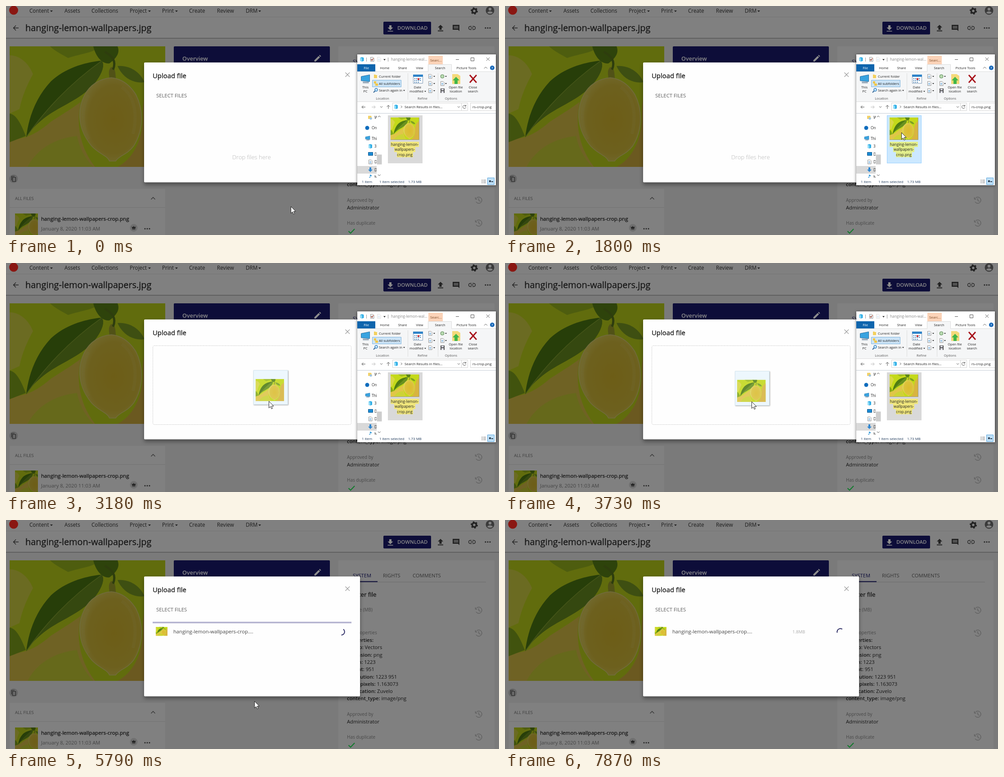
Write an HTML page that moves like this. It is 1096 px wide and 511 px high and loops after 8000 ms.

```html
<!DOCTYPE html>
<html lang="en">
<head>
<meta charset="utf-8">
<title>Upload a file</title>
<style>
  html, body { margin: 0; width: 100%; height: 100%; overflow: hidden; background: #7a7a7a; }
  svg { display: block; }
  #stage { width: 100%; height: 100%; font-family: "Open Sans", "Noto Sans", sans-serif; }
  text { white-space: pre; }
  .nav { font-size: 11.7px; fill: #1c1c1c; }
  .body { font-size: 11.2px; fill: #141414; }
  .hint { font-size: 10px; fill: #484848; }
  .mid { fill: #161616; stroke: #161616; stroke-width: .3; }
  .semi { font-weight: 600; }
  .c { text-anchor: middle; }
  .line { fill: none; stroke: #222; stroke-width: 1.3; }
  .navy { fill: #0d0d39; }
  .win { font-size: 7.4px; fill: #222; }
  .win .line { stroke: #555; stroke-width: 1; }
  #dialog { filter: drop-shadow(0 5px 4px rgba(0,0,0,.38)); }
  #explorer > .frame { filter: drop-shadow(0 1px 3px rgba(0,0,0,.55)); }
  #ghost > .card { filter: drop-shadow(1px 1px 1px rgba(0,0,0,.35)); }
</style>
</head>
<body>
<svg id="stage" viewBox="0 0 1096 511">
  <defs>
    <radialGradient id="peel" cx=".55" cy=".5" r=".55">
      <stop offset="0" stop-color="#dcbc2e"/>
      <stop offset=".75" stop-color="#dcc23c"/>
      <stop offset="1" stop-color="#e4d45c"/>
    </radialGradient>
    <g id="art">
      <path fill="#c4d91a" d="M0 0H346V269H0Z"/>
      <path fill="#d8d844" d="M0 20C24 20 44 40 52 62C40 84 28 110 22 140L0 150Z"/>
      <path fill="#e0c648" d="M0 206C30 210 60 196 92 168C120 150 140 138 158 124C146 180 160 230 190 269H0Z"/>
      <path fill="#cdd336" d="M40 269C60 230 100 205 150 200C156 230 170 252 186 269Z"/>
      <path fill="#d8b440" d="M346 44C316 62 298 90 296 150C298 206 276 250 240 269H346Z"/>
      <path fill="#84a81c" d="M0 150C16 152 26 176 36 200L0 214Z"/>
      <path fill="#9ebc1e" d="M90 0H200C190 14 160 16 130 26C116 18 100 10 90 0Z"/>
      <path fill="#5c8716" d="M186 0H240C246 14 238 26 222 38C206 40 192 24 186 0Z"/>
      <path fill="#7da024" d="M240 44C264 42 288 54 300 80C278 84 252 72 240 44Z"/>
      <path fill="#4f7c12" d="M37 203C42 160 58 114 92 78C122 50 164 36 204 32C214 40 204 66 184 88C156 118 112 134 82 156C58 174 46 188 37 203Z"/>
      <path fill="#6a9220" d="M37 203C76 146 132 84 204 32C214 40 204 66 184 88C156 118 112 134 82 156C58 174 46 188 37 203Z"/>
      <path fill="none" stroke="#8fae34" stroke-width="1.500" d="M38 201C76 146 132 84 204 33"/>
      <path fill="#a3a62e" d="M222 84C224 66 216 56 226 46C238 50 234 62 238 84Z"/>
      <path fill="none" stroke="#5d7a1c" stroke-width="5" d="M230 52C238 32 228 22 212 12"/>
      <path fill="url(#peel)" stroke="#e4d87c" stroke-width="1.500" d="M226 70C248 72 266 84 281 108C300 146 296 190 276 222C262 242 242 244 236 256L222 256C218 244 198 240 182 222C154 188 148 146 166 110C178 86 200 72 226 70Z"/>
      <path fill="none" stroke="#ece49a" stroke-width="7" stroke-dasharray="1 2" opacity=".35" d="M176 206C160 176 160 138 176 108M250 92C276 108 286 150 274 196"/>
    </g>
    <path id="history" fill="none" stroke="#505050" d="M-5.500-4A7 7 0 1 1-6 4M-7.500-6V-2H-3.500M0-4V1L4 3"/>
    <path id="caret" d="M0 0H6L3 3.2Z"/>
    <g id="cube"><path fill="#35b0e6" d="M-4-3.5L0-5 4-3.5V3.5L0 5-4 3.5Z"/><path fill="#8fdcf8" d="M-4-3.5L0-2V5L-4 3.5Z"/></g>
    <g id="page"><path fill="#fff" stroke="#777" stroke-width=".8" d="M-3.5-4.5H2L4-2.5V4.5H-3.5Z"/><path fill="#3f8fd0" d="M-2-1H2V0H-2ZM-2 1.5H2V2.5H-2Z"/></g>
    <g id="pc"><path fill="#38a3e0" stroke="#2c6d9c" stroke-width=".5" d="M-5-3L5-5V3L-5 2Z"/><path fill="#9ab" d="M-3 3H4V5H-3Z"/></g>
    <clipPath id="tree"><path d="M781 240H824V383H781Z"/></clipPath>
  </defs>

  <g id="app">
    <path fill="#7a7a7a" d="M0 0H1096V511H0Z"/>
    <path fill="#606060" d="M0 70H1096V73H0Z"/>
    <path fill="#808080" d="M0 0H1096V71H0Z"/>
    <path fill="#747474" d="M0 24H1096V25H0Z"/>
    <circle cx="17" cy="9.500" r="10" fill="#8a1712"/>
    <g class="nav">
      <text x="52" y="14.500">Content</text><text x="130" y="14.500">Assets</text>
      <text x="190" y="14.500">Collections</text><text x="275" y="14.500">Project</text>
      <text x="347" y="14.500">Print</text><text x="407" y="14.500">Create</text>
      <text x="469" y="14.500">Review</text><text x="533" y="14.500">DRM</text>
      <use href="#caret" x="98" y="10"/><use href="#caret" x="316" y="10"/>
      <use href="#caret" x="376" y="10"/><use href="#caret" x="561" y="10"/>
    </g>
    <circle cx="1041" cy="11" r="4.500" fill="none" stroke="#222" stroke-width="3.600"/>
    <circle cx="1041" cy="11" r="7" fill="none" stroke="#222" stroke-width="2" stroke-dasharray="3.600 3.730"/>
    <circle cx="1076" cy="10" r="9.500" fill="#3a3a3a"/>
    <circle cx="1076" cy="7" r="3.200" fill="#808080"/><path fill="#808080" d="M1070 15C1071 11 1081 11 1082 15C1079 18 1073 18 1070 15Z"/>

    <path class="line" d="M28 49H17M22 43.500L16.500 49 22 54.500"/>
    <text class="mid" x="43" y="56" font-size="19.900">hanging-lemon-wallpapers.jpg</text>
    <rect class="navy" x="839" y="35" width="106" height="28.500" rx="2"/>
    <g fill="#8c8c8c">
      <path d="M852 43H857V48H860.500L854.500 54 848.500 48H852ZM848.500 55.500H860.500V57H848.500Z"/>
      <text class="semi" x="870" y="53" font-size="11.400">DOWNLOAD</text>
    </g>
    <g fill="#222">
      <path d="M963.500 53H968.500V48H972L966 42 960 48H963.500ZM960 54.500H972V56.500H960Z"/>
      <path d="M993 42H1008V56L1005 53H993Z"/>
      <circle cx="1066" cy="49" r="1.600"/><circle cx="1071" cy="49" r="1.600"/><circle cx="1076" cy="49" r="1.600"/>
    </g>
    <path stroke="#808080" d="M995.500 45.500H1005.500M995.500 47.500H1005.500M995.500 49.500H1005.500"/>
    <path class="line" d="M1035 45.500H1032A3.500 3.500 0 0 0 1032 52.500H1035M1037 45.500H1040A3.500 3.500 0 0 1 1040 52.500H1037M1033 49H1039"/>

    <svg x="8" y="90" width="346" height="269" viewBox="0 0 346 269"><use href="#art"/></svg>
    <path opacity=".5" d="M8 90H354V359H8Z"/>
    <circle cx="17" cy="385.500" r="9.500" fill="#686868"/>
    <path class="line" style="stroke-width:1.100" d="M14.500 382.500H21.500V391.500H14.500ZM12.500 389V380H19"/>

    <path fill="#808080" d="M8 408H354V511H8Z"/>
    <path fill="#727272" d="M8 449H354V450H8Z"/>
    <text class="hint" x="20" y="432.500" style="font-size:9.600px;fill:#3c3c3c">ALL FILES</text>
    <path class="line" style="stroke:#333" d="M322.500 431.500L327 427 331.500 431.500"/>
    <svg x="20" y="463" width="51" height="51" viewBox="0 0 346 269" preserveAspectRatio="xMinYMid slice"><use href="#art"/></svg>
    <path opacity=".5" d="M20 463H71V511H20Z"/>
    <text class="mid" x="78" y="478.500" font-size="11.600">hanging-lemon-wallpapers-crop.png</text>
    <text class="body" x="78" y="500.500" style="fill:#444">January 8, 2020 11:03 AM</text>
    <circle cx="284" cy="495" r="8.500" fill="#707070"/>
    <path fill="#222" d="M279.500 491.500L282 494 284 490.500 286 494 288.500 491.500 287.500 497H280.500ZM280.500 498H287.500V499H280.500Z"/>
    <g fill="#222"><circle cx="309" cy="497" r="1.500"/><circle cx="314" cy="497" r="1.500"/><circle cx="319" cy="497" r="1.500"/></g>

    <rect class="navy" x="373" y="90" width="347" height="60" rx="2"/>
    <text class="semi" x="392" y="121.500" font-size="12.600" fill="#8c8c8c">Overview</text>
    <path fill="#8c8c8c" d="M685.500 121L695 111.500 698 114.500 688.500 124H685.500ZM696 110.500L697.500 109 700.500 112 699 113.500Z"/>

    <rect x="739" y="90" width="347" height="425" rx="2" fill="#808080"/>
    <g font-size="11.200" fill="#333">
      <text class="navy" x="771" y="127.500">SYSTEM</text>
      <text x="838" y="127.500">RIGHTS</text><text x="904" y="127.500">COMMENTS</text>
    </g>
    <path fill="#6c6c6c" d="M758 138H1067V139H758Z"/><path class="navy" d="M758 136.500H826V138.500H758Z"/>
    <text class="mid" x="758" y="170.500" font-size="13.300">Master file</text>
    <text class="hint" x="815" y="204" text-anchor="end">File size (MB)</text>
    <text class="hint" x="758" y="255">File properties</text>
    <g class="body" id="props"></g>
    <text class="hint" x="758" y="437">Approved by</text>
    <text class="body" x="758" y="453.500">Administrator</text>
    <text class="hint" x="758" y="487.500">Has duplicate</text>
    <path fill="none" stroke="#0f7a2a" stroke-width="2" d="M761.500 502.500L766 507 775 497.500"/>
    <use href="#history" x="1051" y="201"/><use href="#history" x="1051" y="252"/>
    <use href="#history" x="1051" y="433"/><use href="#history" x="1051" y="484"/>
  </g>

  <rect id="dialog" x="307" y="126" width="480" height="267.500" rx="2" fill="#fefefe"/>
  <text class="mid" x="326" y="161" font-size="14.900">Upload file</text>
  <path fill="none" stroke="#999" stroke-width="1.200" d="M754.500 148.500L764 158M764 148.500L754.500 158"/>
  <text id="select" x="334" y="203.500" font-size="11.300" fill="#5c5c5c">SELECT FILES</text>
  <text id="drop" x="503" y="342" font-size="13" font-weight="300" fill="#b4b4b4">Drop files here</text>
  <rect id="zone" x="326.500" y="184.500" width="441" height="176" rx="3" fill="none" stroke="#c8c8c8" stroke-dasharray="2 1.500"/>

  <g id="upload">
    <g id="bar"><path fill="#b5b4d0" d="M326 227H768V230.500H326Z"/><rect id="fill" x="326" y="227" height="3.500" fill="#25245f"/></g>
    <path id="sync" fill="none" stroke="#c4c4c4" stroke-width="1.400" d="M342 253.500A6 6 0 0 1 346 242.500M350 243.500A6 6 0 0 1 346 254.500M344.500 240L347 242.500 344.500 245M347.500 252L345 254.500 347.500 257"/>
    <svg id="thumb" x="333" y="238.500" width="26" height="20" viewBox="0 0 346 269" preserveAspectRatio="none"><use href="#art"/></svg>
    <text x="372" y="253" font-size="11.200" fill="#444">hanging-lemon-wallpapers-crop....</text>
    <text id="size" x="639" y="253" font-size="9.500" fill="#aaa">1.8MB</text>
    <circle id="spinner" cx="745.500" cy="249.500" r="7.200" fill="none" stroke="#25245f" stroke-width="1.900" stroke-dasharray="17.600 60"/>
  </g>

  <g id="explorer" class="win">
    <rect class="frame" x="781" y="108" width="308" height="292" fill="#fff"/>
    <use href="#cube" x="791.500" y="119"/>
    <path stroke="#999" d="M801.500 115V124M849.500 115V124"/>
    <use href="#page" x="814" y="119"/><path fill="none" stroke="#d2502a" stroke-width="1.300" d="M811.500 119L813.500 121.500 817 116.500"/>
    <use href="#page" x="829" y="119" opacity=".3"/>
    <path d="M839 118.500H844L841.500 121.500Z"/>
    <text x="856" y="122" font-size="8.300" fill="#888">hanging-lemon-wal...</text>
    <path fill="#fbd3b8" d="M939 111H971V131H939Z"/><text x="943" y="123.500" font-size="7.800" fill="#7a4a28">Searc...</text>
    <path class="line" d="M1000 119.500H1007M1033.500 115.500H1040.500V122.500H1033.500ZM1068 115L1075 122M1075 115L1068 122"/>

    <path fill="#0f65ad" d="M781 130H821V146H781Z"/>
    <path fill="#f5f6f7" d="M781 146H1089V213H781Z"/>
    <path fill="#f5f6f7" stroke="#dcdcdc" d="M781 146.500H938.500V130.500H990.500V146.500H1089M781 213.500H1089M893.500 150V209M960.500 150V209"/>
    <g class="c">
      <text x="801" y="141" fill="#fff">File</text><text x="842" y="141">Home</text><text x="881.500" y="141">Share</text>
      <text x="919.500" y="141">View</text><text x="965" y="141">Search</text><text x="1023.500" y="141">Picture Tools</text>
      <text x="799" y="184">This</text><text x="799" y="193">PC</text>
      <text x="915" y="184">Date</text><text x="912.500" y="193">modified</text>
      <text x="1000" y="184">Open file</text><text x="1000" y="193">location</text>
      <text x="1038" y="184">Close</text><text x="1038" y="193">search</text>
      <g fill="#555"><text x="837" y="208.500">Location</text><text x="926" y="208.500">Refine</text><text x="989.500" y="208.500">Options</text></g>
    </g>
    <path class="line" d="M1063 139.500L1066.500 136 1070 139.500"/>
    <circle cx="1081" cy="138" r="5" fill="#1466b8"/><text class="c semi" x="1081" y="141" fill="#fff">?</text>

    <use href="#pc" transform="translate(799 163) scale(1.900)"/>
    <path fill="#f3d05e" d="M818 153H821L822 154H825V161H818Z"/>
    <path fill="#cce4f7" stroke="#7fb4dc" d="M814.500 165.500H878.500V180.500H814.500Z"/>
    <path fill="#f0c64a" d="M818 168H823V173H818ZM821 173H827V178H821Z"/>
    <circle cx="823" cy="187" r="3" fill="#d8efff" stroke="#2d7fc0" stroke-width="1.300"/><path stroke="#2d5f90" stroke-width="1.800" d="M820.500 189.500L817 193"/>
    <text x="829" y="160">Current folder</text><text x="829" y="176">All subfolders</text><text x="829" y="191">Search again in</text>
    <path d="M883 187.500H887L885 190ZM930 189.500H934L932 192ZM950 156H954L952 158.500ZM950 172H954L952 174.500ZM950 188H954L952 190.500ZM976 156H980L978 158.500ZM976 172H980L978 174.500Z"/>
    <path fill="#fff" stroke="#7d98b4" d="M905.500 153.500H926.500V172.500H905.500Z"/><path fill="#2f83c8" d="M905 153H927V158H905Z"/>
    <path stroke="#3a78b0" stroke-width="2" stroke-dasharray="2 2" d="M908 162H924M908 166H924M908 170H918"/><path fill="#d33c3c" d="M915 161H919V165H915Z"/>
    <use href="#page" x="943" y="157"/><use href="#page" x="943" y="173"/><use href="#page" x="943" y="189"/>
    <circle cx="970" cy="157" r="4" fill="#b7d9b0" stroke="#5d8a56"/><use href="#page" x="970" y="173"/>
    <path fill="#555" d="M966 184H975V194H966Z"/><path fill="#dde" d="M968 185H973V188H968ZM968 190H973V194H968Z"/>
    <path fill="#f5d97a" d="M992 152H1004L1010 156V174H992Z"/><path fill="#42b649" d="M997 174V166H993L1000.500 158 1008 166H1004V174Z"/>
    <path stroke="#a8141c" stroke-width="3" d="M1031 154L1046 171M1046 154L1031 171"/>

    <path class="line" d="M799 225.500H791M794.500 222L791 225.500 794.500 229M832 224L834.500 226.500 837 224M850 229.500V221.500M846.500 225L850 221.500 853.500 225M878 222.500L880.500 225 878 227.500M1004 224L1006.500 226.500 1009 224M1021.500 222.500A3.500 3.500 0 1 0 1022.500 226M1022.500 220.500V223.500H1019.500"/>
    <path fill="none" stroke="#bbb" d="M813 225.500H821M817.500 222L821 225.500 817.500 229"/>
    <path fill="none" stroke="#d4d4d4" d="M859.500 216.500H1026.500V233.500H859.500ZM1012.500 217V233M1089 216.500H1032.500V233.500H1089"/>
    <path stroke="#c4ccd4" d="M781 239.500H1089"/>
    <use href="#cube" x="867" y="225"/>
    <text x="886" y="227.500" font-size="7.800">Search Results in files...</text>
    <text x="1037" y="228" font-size="8">rs-crop.png</text>

    <g clip-path="url(#tree)" font-size="8.200">
      <path fill="#d9d9d9" d="M781 357H824V374H781Z"/>
      <path fill="#f2d168" d="M805 245H812L814 252H805Z"/><circle cx="811" cy="251" r="2.600" fill="#9cc4e4"/>
      <circle cx="803" cy="272" r="4.500" fill="#0f6cbd"/>
      <use href="#pc" x="804" y="295"/><use href="#cube" x="810" y="313"/>
      <path fill="#1a8ad4" stroke="#14598c" d="M805.500 326.500H815.500V333.500H805.500Z"/>
      <use href="#page" x="810" y="348"/>
      <path fill="#2f86d0" d="M808 360H812V365H815L810 370.500 805 365H808Z"/>
      <path fill="#2492d6" d="M809 376L813 378V380L810 379V384H807V382H809Z"/>
      <text x="819" y="252">W</text><text x="813" y="275">On</text><text x="813" y="298.500">Thi</text><text x="819" y="316">3</text>
      <text x="819" y="333.500">D</text><text x="819" y="351">D</text><text x="819" y="368.500">D</text><text x="819" y="385">M</text>
    </g>
    <path fill="#cdcdcd" d="M824.500 331.500H835.500V353.500H824.500Z"/>
    <path class="line" d="M827 248L829.700 245 832.500 248M827 376L829.700 379 832.500 376"/>

    <rect id="tile" x="849.500" y="244.500" width="76" height="106"/>
    <svg x="855" y="248.500" width="63.500" height="50" viewBox="0 0 346 269" preserveAspectRatio="none"><use href="#art"/></svg>
    <path fill="none" stroke="#888" stroke-width=".7" d="M918.500 249V298.500H855"/>
    <path id="mark" d="M855 303H918V314.500H910V326H905V337.500H869V326H863V314.500H855Z"/>
    <g class="c" font-size="8.400"><text x="886.500" y="311.500">hanging-lemon-</text><text x="886.500" y="323">wallpapers-</text><text x="886.500" y="334.500">crop.png</text></g>

    <g font-size="7.900" fill="#1e395b"><text x="791" y="394.500">1 item</text><text x="830" y="394.500">1 item selected</text><text x="894" y="394.500">1.73 MB</text></g>
    <path stroke="#777" stroke-dasharray="3 1 6 10" d="M1057 388.500H1067M1057 391.500H1067M1057 394.500H1067"/>
    <path fill="#bfe0f7" stroke="#5aa5dc" d="M1070.500 383.500H1085.500V398.500H1070.500Z"/><path fill="#345" d="M1074 389H1078V393H1074ZM1079 391H1083V393H1079Z"/>
  </g>

  <g id="ghost">
    <rect class="card" x="-36.500" y="-67.500" width="76" height="76" fill="#edf7fd" stroke="#d4e6f0"/>
    <svg x="-32" y="-48.500" width="63.500" height="49.500" viewBox="0 0 346 269" preserveAspectRatio="none" opacity=".88"><use href="#art"/></svg>
  </g>
  <path id="cursor" fill="#fff" stroke="#111" stroke-width=".9" d="M.5.500V15.500L4 12.300 6.300 17.500 8.600 16.500 6.400 11.300H11Z"/>
</svg>

<script>
  const LOOP = 8000, FADE_CURSOR = 6480, GHOST_LAG = .1;
  const T = { hover: 1260, drag: 2640, over: 2910, send: 4700, preview: 4840, done: 7720 };
  const $ = id => document.getElementById(id);
  const show = (id, on) => $(id).setAttribute('visibility', on ? 'inherit' : 'hidden');
  const move = (id, x, y) => $(id).setAttribute('transform', `translate(${x} ${y})`);

  // time, x, y
  const cursorPath = [
    [0, 633, 447], [840, 684, 418], [990, 742, 370], [1110, 802, 324], [1260, 856, 293],
    [1380, 878, 284], [1530, 881, 282], [2640, 838, 283], [2790, 762, 290], [2910, 677, 297],
    [3060, 612, 300], [3180, 584, 308], [3300, 568, 308], [3450, 555, 309], [3580, 549, 309],
    [3730, 548, 309], [5390, 549, 325], [5520, 551, 353], [5670, 551, 384], [5790, 552, 404],
    [5940, 566, 450], [6070, 584, 483], [6210, 585, 485]
  ];
  const progress = [[0, 0], [7160, 26], [7310, 180], [7440, 330], [7590, 442]];
  const spinTicks = [4700, 4840, 4970, 5120, 5240, 5390, 5520, 5670, 5790, 5940, 6070, 6210,
    6330, 6480, 6610, 6760, 6890, 7030, 7160, 7310, 7440, 7590, 7720, 7870];

  const props = [['Properties', ''], ['Group', 'Vectors'], ['Extension', 'png'], ['Width', '1223'],
    ['Height', '951'], ['Resolution', '1223 951'], ['Megapixels', '1.163073'],
    ['Application', 'Zuvelo'], ['content_type', 'image/png']];
  $('props').innerHTML = props.map(([name, value], i) =>
    `<text x="758" y="${272 + i * 16.3}"><tspan class="semi">${name}:</tspan> ${value}</text>`).join('');

  const indexAt = (steps, t) => steps.findLastIndex(s => s[0] <= t);

  function draw(t) {
    const i = indexAt(cursorPath, t);
    const [, x, y] = cursorPath[i];
    const [, fromX, fromY] = cursorPath[Math.max(i - 1, 0)];
    const sending = t >= T.send;
    const overZone = t >= T.over && !sending;
    const hovered = t >= T.hover && t < T.drag;

    move('cursor', x, y);
    move('ghost', x + (fromX - x) * GHOST_LAG, y + (fromY - y) * GHOST_LAG);
    show('cursor', t < FADE_CURSOR);
    show('ghost', t >= T.drag && !sending);
    show('explorer', !sending);
    show('select', !overZone);
    show('drop', t < T.over);
    show('zone', overZone);

    $('tile').setAttribute('fill', hovered ? '#cce8ff' : '#d9d9d9');
    $('tile').setAttribute('stroke', hovered ? '#99d1ff' : '#d9d9d9');
    $('mark').setAttribute('fill', hovered ? '#e2ee8c' : '#f0e67c');

    show('upload', sending);
    show('sync', sending && t < T.preview);
    show('thumb', t >= T.preview);
    show('bar', sending && t < T.done);
    show('size', t >= T.done);
    $('fill').setAttribute('width', progress[indexAt(progress, t)][1]);
    if (sending) {
      const tick = spinTicks.findLast(s => s <= t);
      const angle = 178 + (tick - T.send) / 800 * 360;
      $('spinner').setAttribute('transform', `rotate(${angle} 745.5 249.5)`);
    }
  }

  const start = performance.now();
  function frame() {
    draw((performance.now() - start) % LOOP);
    requestAnimationFrame(frame);
  }
  frame();
</script>
</body>
</html>
```
